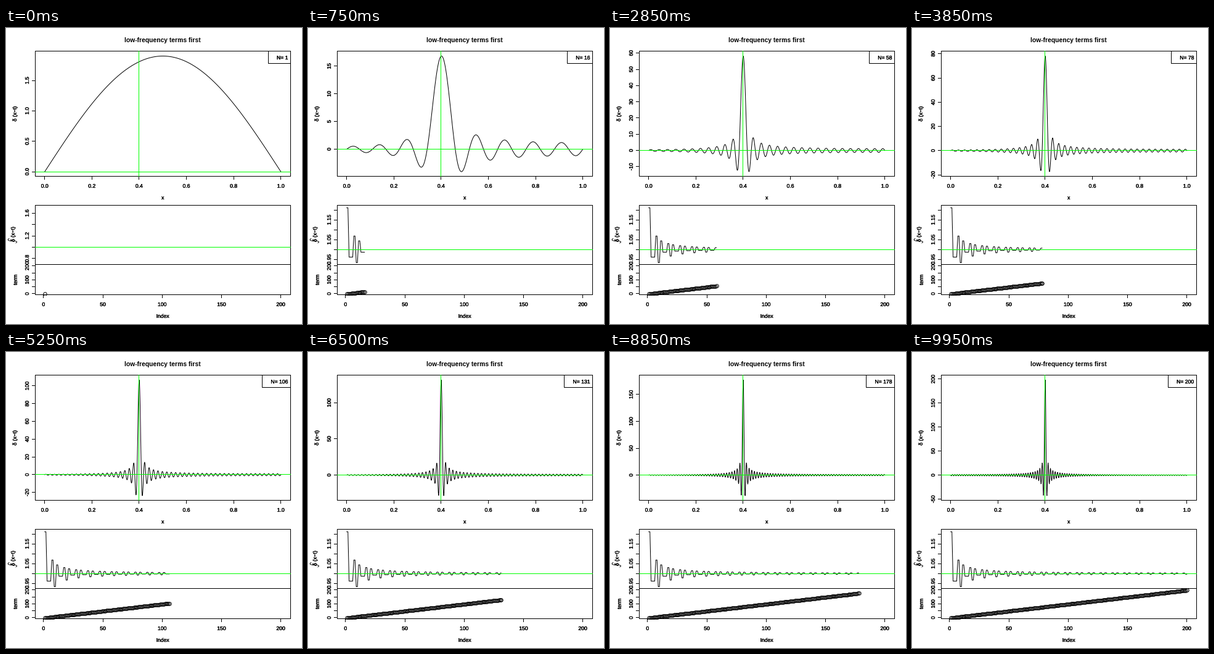
Animation of 480x480 px, one loop 10 s. Source, as a matplotlib script:

```python
import math

import matplotlib.pyplot as plt
import numpy as np
from matplotlib.animation import FuncAnimation
from matplotlib.patches import Rectangle
from matplotlib.patheffects import withStroke

SIZE, TERMS, T = 480, 200, 0.4
GREEN = "#00ff00"
LEFT, RIGHT = 47.5, 461.0
TOP_PANEL = (38.0, 240.5)
MID_PANEL = (288.0, 384.0)
LOW_PANEL = (384.0, 432.5)
TICK = 4.75
FONT = 8.6

plt.rcParams.update({
    "font.family": "Liberation Sans",
    "path.simplify": False,
})

# Partial sums of the sine series of a delta at T, and their integrals
x = np.linspace(0, 1, 1000)
n = np.arange(1, TERMS + 1)
sums = np.cumsum(2 * np.sin(n * np.pi * T)[:, None]
                 * np.sin(np.pi * n[:, None] * x), axis=0)
areas = sums.sum(axis=1) / (len(x) - 1)

fig = plt.figure(figsize=(SIZE / 72, SIZE / 72), dpi=72, facecolor="white")
ax = fig.add_axes([0, 0, 1, 1])
ax.set_xlim(0, SIZE)
ax.set_ylim(SIZE, 0)
ax.axis("off")


def limits(lo, hi):
    """Axis range with a 4% margin; a flat range is opened up first."""
    if hi - lo < 1e-9:
        pad = 0.4 * max(abs(lo), abs(hi))
        lo, hi = lo - pad, hi + pad
    pad = 0.04 * (hi - lo)
    return lo - pad, hi + pad


def x_pixel(v, lim):
    return LEFT + (v - lim[0]) / (lim[1] - lim[0]) * (RIGHT - LEFT)


def y_pixel(v, lim, panel):
    return panel[1] - (v - lim[0]) / (lim[1] - lim[0]) * (panel[1] - panel[0])


def curve(xs, ys, width=1.0):
    return ax.plot(xs, ys, color="black", lw=width, snap=False,
                   solid_joinstyle="round", zorder=2)[0]


def rule(xs, ys, color="black", z=2.5):
    """Straight line that fills whole pixels."""
    return ax.plot(np.floor(xs) + 0.5, np.floor(ys) + 0.5, color=color, lw=1,
                   snap=False, solid_capstyle="projecting", zorder=z)[0]


def label(px, py, s, ha="center", **kw):
    """Black text, slightly thickened like small screen type."""
    return ax.text(px, py, s, fontsize=FONT, ha=ha, va="baseline",
                   rotation_mode="anchor", zorder=6,
                   path_effects=[withStroke(linewidth=0.35,
                                            foreground="black")], **kw)


def frame_box(x0, y0, x1, y1, fill="none", z=2.5):
    return ax.add_patch(Rectangle((x0 + 0.5, y0 + 0.5), x1 - x0, y1 - y0,
                                  fc=fill, ec="black", lw=1, snap=False,
                                  joinstyle="miter", zorder=z))


def pretty(lo, hi):
    """Round tick values, about five of them, and their decimals."""
    cell = (hi - lo) / 5
    base = 10.0 ** math.floor(math.log10(cell))
    unit = base
    for mult, bias in ((2, 0.8), (5, 1.7), (10, 0.8)):
        if mult * base - cell < bias * (cell - unit):
            unit = mult * base
    first = math.ceil(lo / unit - 1e-7)
    last = math.floor(hi / unit + 1e-7)
    decimals = max(0, -math.floor(math.log10(unit) + 1e-9))
    return [k * unit for k in range(first, last + 1)], decimals


def text_width(s):
    return FONT * sum({".": 0.278, "-": 0.333}.get(c, 0.556) for c in s)


def y_axis(lim, panel):
    """Ticks on the left; labels that would crowd the last one are left out."""
    parts = []
    values, decimals = pretty(*lim)
    used = math.inf
    for v in values:
        py = y_pixel(v, lim, panel)
        parts.append(rule([LEFT - TICK, LEFT], [py, py]))
        s = f"{v:.{decimals}f}"
        half = text_width(s) / 2
        if py + half < used - 7:
            parts.append(label(37, py, s, rotation=90))
            used = py - half
    return parts


def x_axis(values, lim, bottom, fmt):
    for v in values:
        px = x_pixel(v, lim)
        rule([px, px], [bottom, bottom + TICK])
        label(px, bottom + 18.5, fmt.format(v))


def level_line(py):
    return rule([LEFT, RIGHT], [py, py], GREEN, 4)


X_LIM = limits(0, 1)
N_LIM = limits(1, TERMS)
MIDDLE = (LEFT + RIGHT) / 2
curve_x = x_pixel(x, X_LIM)
index_x = x_pixel(n, N_LIM)
term_y = y_pixel(n, N_LIM, LOW_PANEL)

# Fixed parts
ax.text(MIDDLE, 23, "low-frequency terms first", fontsize=10.2,
        weight="bold", ha="center", va="baseline")
frame_box(47, 37, 461, 240)
frame_box(47, 287, 461, 383)
frame_box(47, 383, 461, 432)
x_axis([k / 5 for k in range(6)], X_LIM, TOP_PANEL[1], "{:.1f}")
x_axis(range(0, 201, 50), N_LIM, LOW_PANEL[1], "{}")
label(MIDDLE, 278, "x")
label(MIDDLE, 470, "Index")
y_axis(N_LIM, LOW_PANEL)
label(17, 139.2, "δ (x−t)", rotation=90)
label(14, 334.5, "δ (x−t)", rotation=90)
label(18, 408.2, "term", rotation=90)
# Integral sign lying on its side
curve([5, 3.3, 3.3, 5, 15.5, 17.5, 17.5, 16],
      [341.5, 342.5, 344, 345, 345.5, 346.5, 347.5, 348.5], 0.9)
mark = x_pixel(T, X_LIM)
rule([mark, mark], [37, 240], GREEN, 4)

live = []


def reset():
    while live:
        live.pop().remove()
    return []


def draw(i):
    reset()
    count = i + 1

    y = sums[i]
    lim = limits(y.min(), y.max())
    live.append(curve(curve_x, y_pixel(y, lim, TOP_PANEL)))
    live.append(level_line(y_pixel(0, lim, TOP_PANEL)))
    live.extend(y_axis(lim, TOP_PANEL))

    part = areas[:count]
    lim = limits(part.min(), part.max())
    if count > 1:
        live.append(curve(index_x[:count], y_pixel(part, lim, MID_PANEL)))
    live.append(level_line(y_pixel(1, lim, MID_PANEL)))
    live.extend(y_axis(lim, MID_PANEL))

    dots, = ax.plot(np.floor(index_x[:count]) + 0.5,
                    np.floor(term_y[:count]) + 0.5, "o", ms=5.5, mew=1,
                    mfc="none", mec="black", snap=False, zorder=2)
    dots.set_clip_path(Rectangle((47, 383), 415, 50, transform=ax.transData))
    live.append(dots)

    live.append(frame_box(430 - 5 * len(str(count)), 37, 461, 57, "white", 5))
    live.append(label(457.5, 51, f"N= {count}", ha="right"))
    return live


anim = FuncAnimation(fig, draw, frames=TERMS, init_func=reset, interval=50,
                     repeat=True, repeat_delay=0, blit=False)
plt.show()
```
